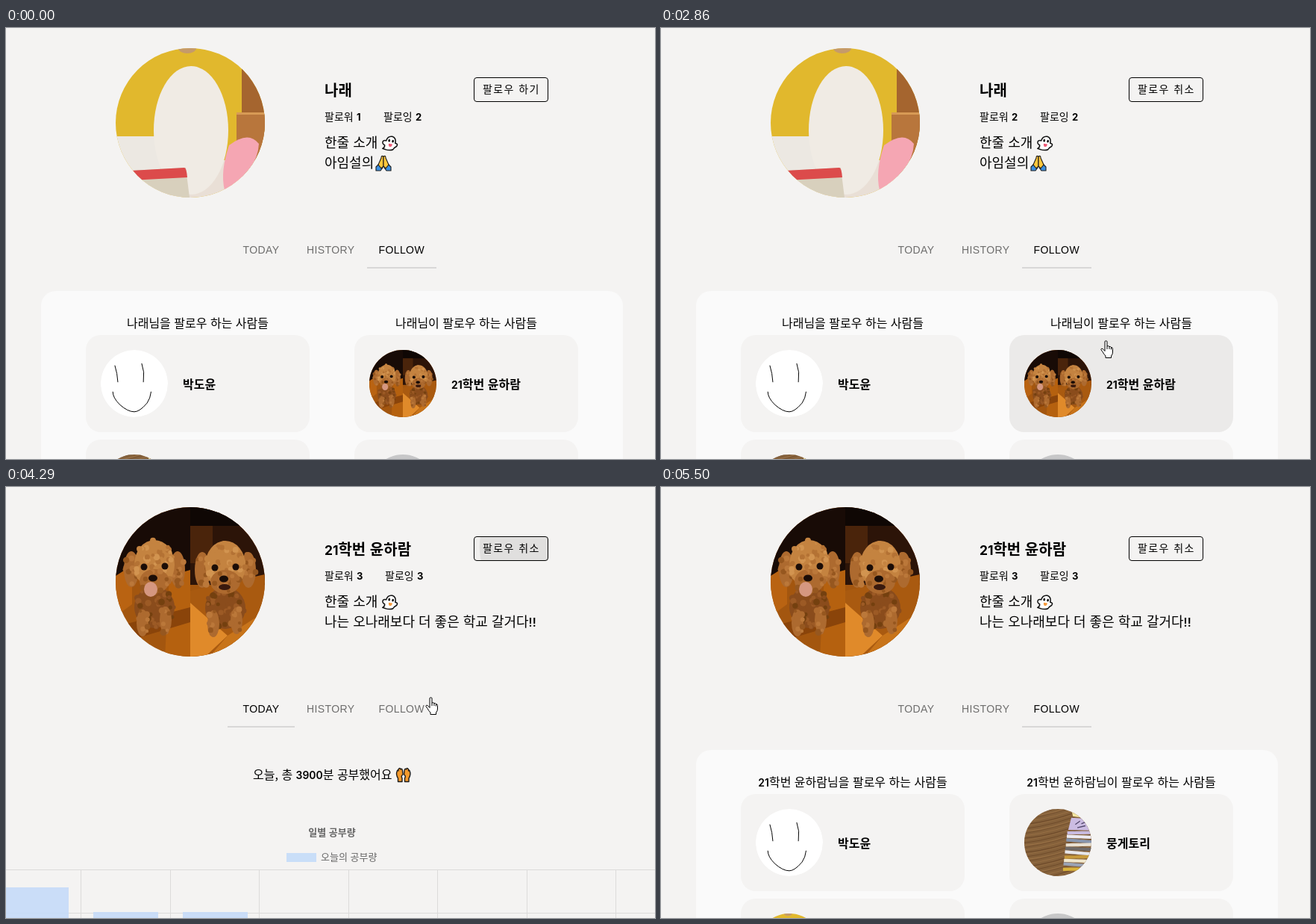
Write an HTML page that moves like this. It is 870 px wide and 577 px high and loops after 5.76 s.

```html
<!DOCTYPE html>
<html lang="ko">
<head>
<meta charset="utf-8">
<title>Follow page</title>
<style>
html, body { margin: 0; width: 100%; height: 100%; overflow: hidden; background: #f4f3f2; }
svg { display: block; width: 870px; height: 577px; }
text { font-family: 'Noto Sans CJK KR', 'Noto Sans KR', 'Noto Sans CJK', sans-serif; fill: #000; white-space: pre; }
.num { font-family: Inter, sans-serif; font-size: .87em; font-weight: 600; }
.bold, .bold .num { font-weight: 700; }
.tab { font: 14px 'Liberation Sans', Arial, sans-serif; letter-spacing: .4px; }
.mid { text-anchor: middle; }
.gray { fill: #666; }
</style>
</head>
<body>
<svg id="stage" viewBox="0 0 870 577" xmlns="http://www.w3.org/2000/svg"></svg>
<script>
const LOOP = 5760;
const HOST = '나래', FRIEND = '21학번 윤하람', FAN = '박도윤', PAL = '뭉게토리';

// Runs of picture changes: first time, last time, number of steps.
const RUNS = [
  [0, 0, 1], [320, 860, 9], [920, 1060, 3], [1320, 1850, 8], [1920, 2010, 2], [2150, 2150, 1],
  [2470, 3000, 8], [3090, 3230, 3], [3390, 3940, 8], [4010, 4570, 9], [4640, 5210, 9], [5270, 5500, 4]
];
// Pointer path: time, x, y.
const PATH = [
  [320, 850, 562], [500, 812, 400], [700, 735, 170], [860, 712, 92], [920, 709, 84], [1060, 707, 77],
  [1320, 707, 78], [1390, 704, 88], [1550, 668, 200], [1750, 640, 335], [1850, 633, 346],
  [1920, 643, 342], [2010, 652, 330], [2150, 652, 329], [2470, 627, 329], [2610, 598, 311],
  [2750, 592, 360], [2900, 600, 450], [3000, 605, 482], [3320, 605, 482], [3500, 620, 400],
  [3600, 665, 220], [3700, 706, 95], [3780, 712, 67], [3940, 711, 66], [4010, 710, 63],
  [4080, 706, 72], [4290, 570, 282], [4360, 551, 294], [4430, 551, 294], [4570, 565, 340],
  [4640, 581, 382], [5000, 622, 470], [5210, 630, 482], [5270, 636, 500], [5420, 650, 560], [5500, 655, 577]
];
const PAGE_OUT = 3080, PAGE_IN = 3160, TAB_CLICK = 4425;
const BUTTON = [627, 60, 100, 39], TABS = [297, 274, 280, 48];
const CARDS = [[107, 411], [467, 411], [107, 551], [467, 551]];

const clamp = v => Math.max(0, Math.min(1, v));
const mix = (a, b, k) => a + (b - a) * k;

// cubic-bezier(.4, 0, .2, 1)
function ease(p) {
  p = clamp(p);
  let lo = 0, hi = 1, s = 0;
  for (let i = 0; i < 20; i++) {
    s = (lo + hi) / 2;
    const x = 1.2 * s * (1 - s) ** 2 + .6 * s * s * (1 - s) + s ** 3;
    if (x < p) lo = s; else hi = s;
  }
  return 3 * s * s * (1 - s) + s ** 3;
}

function stepTime(t) {
  const [from, to, n] = RUNS.filter(r => r[0] <= t).pop();
  if (n === 1) return from;
  const gap = (to - from) / (n - 1);
  return from + Math.min(n - 1, Math.floor((t - from) / gap + .1)) * gap;
}

function pointerAt(t) {
  if (t < PATH[0][0] || t >= 5490) return null;
  const i = Math.max(1, PATH.findIndex(p => p[0] >= t));
  const [t0, x0, y0] = PATH[i - 1], [t1, x1, y1] = PATH[i];
  const k = clamp((t - t0) / (t1 - t0));
  return [Math.round(mix(x0, x1, k)), Math.round(mix(y0, y1, k))];
}

const inside = (p, [x, y, w, h]) => !!p && p[0] >= x && p[0] < x + w && p[1] >= y && p[1] < y + h;

// ---- drawing helpers
const rect = (x, y, w, h, fill, more = '') => `<rect x="${x}" y="${y}" width="${w}" height="${h}" fill="${fill}" ${more}/>`;
const oval = (x, y, rx, ry, fill) => `<ellipse cx="${x}" cy="${y}" rx="${rx}" ry="${ry}" fill="${fill}"/>`;
const path = (d, fill, more = '') => `<path d="${d}" fill="${fill}" ${more}/>`;
const label = (id, x, y, size, cls = '', body = '') =>
  `<text id="${id}" x="${x}" y="${y}" font-size="${size}" class="${cls}">${body}</text>`;
const num = s => String(s).replace(/[\d!]+/g, d => `<tspan class="num">${d}</tspan>`);
const photo = (id, body) => `<g id="${id}" clip-path="url(#disc)">${body}</g>`;
const avatar = (id, x, y, r) => `<use id="${id}" transform="translate(${x - r} ${y - r}) scale(${r / 100})"/>`;

let seed = 7;
const rand = () => (seed = seed * 16807 % 2147483647) / 2147483647;

const toyPhoto = rect(0, 0, 200, 200, '#e1b82d') +
  rect(169, 0, 31, 200, '#a5652f') + rect(162, 88, 40, 60, '#b8763c') + rect(162, 86, 40, 3, '#d79a55') +
  rect(0, 118, 60, 82, '#ece8e2') + rect(60, 150, 140, 50, '#e9dfd6') + oval(96, 0, 12, 7, '#c59a6a') +
  oval(101, 110, 50, 86, '#f0ebe4') +
  path('M152 130Q178 110 192 128Q190 165 146 190Q140 165 152 130Z', '#f5a6b3') +
  path('M20 164L94 160L99 200H20Z', '#d8d0bd') + path('M20 164L92 160Q95 160 96 173L20 177Z', '#dc4b4b');

// Scattered curls over an oval of fur.
function fur(x, y, rx, ry, tones) {
  let s = oval(x, y, rx, ry, tones[0]);
  for (let i = 0; i < rx * ry / 18; i++) {
    const a = rand() * 2 * Math.PI, d = Math.sqrt(rand()), r = 2 + rand() * 2.5;
    s += oval((x + d * rx * Math.cos(a)).toFixed(1), (y + d * ry * Math.sin(a)).toFixed(1), r.toFixed(1), r.toFixed(1), tones[i % tones.length]);
  }
  return s;
}
const DARK_FUR = ['#8a4c1c', '#9c5a25', '#74400f'], MID_FUR = ['#ad6a2f', '#bb783a', '#96571f'], LIGHT_FUR = ['#c48340', '#d29450', '#b47234'];

function dog(x, y) {
  return `<g transform="translate(${x} ${y})">` +
    fur(0, 55, 27, 28, DARK_FUR) + fur(-16, 76, 8, 18, MID_FUR) + fur(15, 72, 8, 18, MID_FUR) +
    fur(-31, 4, 10, 24, MID_FUR) + fur(31, 4, 10, 24, MID_FUR) + fur(0, -2, 27, 33, LIGHT_FUR) +
    fur(0, 20, 20, 16, MID_FUR) + oval(-14, 1, 4.5, 4.5, '#1b0d07') + oval(14, 0, 4.5, 4.5, '#1b0d07') +
    oval(-2, 16, 6, 4.5, '#1b0d07') + '</g>';
}
const dogPhoto = rect(0, 0, 200, 200, '#a3560f') + rect(0, 0, 100, 92, '#180b06') +
  path('M0 92L22 78V130L0 146Z', '#b96312') + path('M72 92L100 84V200H66Z', '#b5610f') +
  path('M0 160L100 134V154L0 184Z', '#8a440a') +
  rect(100, 0, 100, 104, '#2c1408') + rect(100, 0, 100, 25, '#0f0704') + rect(100, 25, 30, 50, '#4a240b') +
  path('M100 112L200 90V200H100Z', '#a95a10') + path('M100 128L150 172L120 200H100Z', '#e08a2a') +
  path('M150 172L200 140V200H126Z', '#c8741a') +
  dog(52, 79) + dog(147, 80) +
  oval(47, 110, 9, 10, '#d59780') + oval(146, 107, 8, 4, '#3a1a0e');

let grain = '';
for (let i = 0; i < 44; i++) {
  const y = i * 7 - 30;
  grain += path(`M0 ${y + 40}Q90 ${y + 26 + i % 3 * 4} 200 ${y - 14}`, 'none', `stroke="${i % 2 ? '#6d4a2a' : '#987045'}" stroke-width="${1.5 + i % 3 * .6}"`);
}
const bookColors = ['#c9bbe0', '#eceaf2', '#8795ad', '#e8e0d2', '#6f6a68', '#e6e6ea', '#c79a3c', '#f0e7cd', '#9aa3b5', '#d9b23a'];
const bookPhoto = rect(0, 0, 200, 200, '#84603a') + grain + path('M140 0H172L176 26L145 22Z', '#f3e6a2') +
  path('M140 26L200 30V64L131 62Z', '#cbbce2') + path('M152 46L166 36M170 44L184 38M158 56L182 50', 'none', 'stroke="#51476a" stroke-width="3"') +
  bookColors.map((c, i) => rect(128 - i * 1.4, 66 + i * 12, 80, 9.5, c, `transform="rotate(${i % 3 * 3 - 1} 160 ${70 + i * 12})"`)).join('');

const doodle = '<circle cx="100" cy="100" r="100" fill="#fff"/>' +
  path('M42 46L48 70L51 96M122 40L128 66L127 96M36 124Q36 142 56 162Q80 184 100 184Q116 184 138 158Q148 144 150 124', 'none', 'stroke="#000" stroke-width="2.2"');

const ghost = `<g transform="translate(504 144) rotate(10 11 11)" stroke="#111" stroke-width="1.5" stroke-linejoin="round">` +
  path('M5 8Q6 1 12 1Q18 2 17.5 9Q22 9 20 13Q17 15 16 18Q12 21 2 19Q5 17 4 14Q0 13 1 9Q3 7 5 8Z', '#fff') +
  `<g stroke="none">${oval(9, 7, 1.4, 1.9, '#111')}${oval(14, 7, 1.4, 1.9, '#111')}</g>` +
  `<path id="tongue" d="M9 11H14Q14 15 11.5 15Q9 15 9 11Z" stroke="none"/></g>`;
const prayer = `<g id="prayer" transform="translate(495 170)" stroke="#1c1c1c" stroke-width="1.1" stroke-linejoin="round">` +
  path('M1 16L5 12L10 17L7 21H1Z', '#3b8fe0') + path('M21 16L17 12L12 17L15 21H21Z', '#3b8fe0') +
  path('M11 2Q8 0 8 4L4 13L8 18L11 15Z', '#ffc83d') + path('M11 2Q14 0 14 4L18 13L14 18L11 15Z', '#ffc83d') + '</g>';
const palm = path('M8 18.5H2.5V14Q-.5 9 1 5Q2 2 3 4V2Q5 -1 6 2Q8 0 8.5 4L9 9Q6 11 8 14Z', '#f59a2c');
const raised = `<g transform="translate(523 376)" stroke="#1c1c1c" stroke-width="1.4" stroke-linejoin="round">${palm}<g transform="translate(19.5 0) scale(-1 1)">${palm}</g></g>`;

let chart = '';
for (let i = 0; i < 7; i++) chart += rect(Math.round(100 + i * 119.5), 512, 1, 65, '#dcdbda');
chart += rect(0, 512, 870, 1, '#dcdbda') + rect(0, 570, 870, 1, '#dcdbda');
for (let i = 0; i < 3; i++) chart += rect(-3 + i * 120, 577, 87, 0, '#c4dbfa', `id="bar${i}" fill-opacity=".88"`);

document.getElementById('stage').innerHTML = `
<defs>
  <clipPath id="disc"><circle cx="100" cy="100" r="100"/></clipPath>
  <clipPath id="btnClip"><rect x="627" y="66" width="100" height="33" rx="4"/></clipPath>
  <clipPath id="tabClip"><rect x="484" y="274" width="93" height="48"/></clipPath>
  ${photo('toy', toyPhoto)}${photo('dogs', dogPhoto)}${photo('books', bookPhoto)}${photo('doodle', doodle)}
  <g id="blank"><circle cx="100" cy="100" r="100" fill="#c7c7c8"/></g>
</defs>
${rect(0, 0, 870, 577, '#f4f3f2')}
<g id="page">
  ${avatar('portrait', 247, 127, 100)}
  ${label('title', 427, 91, 20, 'bold')}
  ${label('', 427, 124, 14, '', '팔로워')}${label('followers', 470, 123.5, 15, 'bold')}
  ${label('followingLabel', 506, 124, 14, '', '팔로잉')}${label('following', 549, 123.5, 15, 'bold')}
  ${label('', 427, 160, 18, '', '한줄 소개')}${label('intro', 427, 186.5, 18)}${ghost}${prayer}
  ${rect(627.5, 66.5, 99, 32, '#000', 'id="button" rx="3.5" stroke="#000"')}
  <g clip-path="url(#btnClip)"><circle id="btnRipple"/></g>
  <text id="action" x="639" y="86.5" font-size="14" font-weight="300" letter-spacing="1.4"></text>
  ${rect(297, 320, 90, 2, '#d8d7d7', 'id="indicator"')}
  <g clip-path="url(#tabClip)"><circle id="tabRipple"/></g>
  <text class="tab" id="tab0" x="317.5" y="302">TODAY</text>
  <text class="tab" x="403" y="302" fill-opacity=".55">HISTORY</text>
  <text class="tab" id="tab2" x="499.5" y="302">FOLLOW</text>
  <g id="today">
    ${label('', 331, 390.5, 16, '', '오늘, 총 ' + num(3900) + '분 공부했어요')}${raised}
    ${label('', 437, 467, 13, 'bold mid gray', '일별 공부량')}
    ${rect(376, 490, 40, 12, '#c9def8')}${label('', 422, 500, 13, 'gray', '오늘의 공부량')}
    ${chart}
  </g>
  <g id="follow">
    ${rect(47, 352, 780, 300, '#fafafa', 'rx="20"')}
    ${label('headL', 257, 400.5, 16, 'mid')}${label('headR', 617, 400.5, 16, 'mid')}
    ${CARDS.map(([x, y], i) => rect(x, y, 300, 130, '#f4f3f2', `id="card${i}" rx="20"`) + avatar('face' + i, x + 65, y + 65, 45)).join('')}
    ${label('nameL', 237, 482.5, 16, 'bold')}${label('nameR', 597, 482.5, 16, 'bold')}
  </g>
</g>
<path id="arrow" d="M.5 .5V16.5L4.2 13L6.8 18.8L9.2 17.7L6.7 12.1H11.5Z" fill="#fff"/>
<path id="hand" d="M6 1.5Q7.5 0 9 1.5V8Q10.5 7 12 8.5Q13.5 8 14.5 9.5Q16.5 9.5 16.5 11.5V16Q16.5 19 14.5 21V23.5H7V21Q4.5 18.5 3 15.5L.8 12.5Q1 10.5 3.2 11.5L6 14.5ZM9 8V12M12 8.5V12M14.5 9.5V12.5" fill="#fff" stroke="#000"/>`;

// ---- updates
const nodes = {}, last = {};
const $ = id => nodes[id] || (nodes[id] = document.getElementById(id));
const set = (id, attrs) => { for (const k in attrs) $(id).setAttribute(k, attrs[k]); };
const show = (id, on) => set(id, { visibility: on ? 'inherit' : 'hidden' });
const write = (id, s) => { if (last[id] !== s) $(id).innerHTML = last[id] = s; };

function ripple(id, t, start, x, y, size) {
  const r = size * ease((t - start) / 550);
  const alpha = t < start ? 0 : .3 * (1 - ease((t - start - 55) / 550));
  set(id, { cx: x, cy: y, r, 'fill-opacity': alpha });
}

function render(now) {
  const t = stepTime(now % LOOP);
  const second = t >= PAGE_OUT, loaded = !second || t >= PAGE_IN - 1;
  const follow = !second || t >= TAB_CLICK;
  const followed = second ? t >= 4075 : t >= 1385;
  const who = second ? FRIEND : HOST;

  set('page', { visibility: loaded ? 'visible' : 'hidden' });
  show('follow', follow);
  show('today', !follow);
  show('prayer', !second);
  set('tongue', { fill: second ? '#f59a3c' : '#ee5a75' });
  set('portrait', { href: second ? '#dogs' : '#toy' });

  write('title', num(who));
  write('followers', num((second ? 2 : 1) + followed));
  write('following', num(second ? 3 : 2));
  const shift = second || followed ? 2 : 0;
  set('followingLabel', { x: 506 + shift });
  set('following', { x: 549 + shift });
  write('intro', second ? num('나는 오나래보다 더 좋은 학교 갈거다!!') : '아임설의');
  write('action', followed ? '팔로우 취소' : '팔로우 하기');

  const [enter, leave, press] = second ? [3760, 4130, 3960] : [900, 1440, 1265];
  const glow = clamp((t - enter) / 150) - clamp((t - leave) / 250);
  set('button', { 'fill-opacity': .045 * Math.max(0, glow) });
  ripple('btnRipple', t, press, second ? 710 : 707, 80, 86);
  ripple('tabRipple', t, 4372, 551, 294, 73);

  const slide = second ? ease((t - TAB_CLICK) / 300) : 1;
  set('indicator', { x: mix(297, 484, slide), width: mix(90, 93, slide) });
  set('tab0', { 'fill-opacity': follow ? .55 : 1 });
  set('tab2', { 'fill-opacity': follow ? 1 : .55 });

  write('headL', num(who) + '님을 팔로우 하는 사람들');
  write('headR', num(who) + '님이 팔로우 하는 사람들');
  write('nameL', FAN);
  write('nameR', num(second ? PAL : FRIEND));
  const faces = second ? ['doodle', 'books', 'toy', 'blank'] : ['doodle', 'dogs', 'books', 'blank'];
  faces.forEach((f, i) => set('face' + i, { href: '#' + f }));

  const grow = 1 - (1 - clamp((t - PAGE_IN) / 1000)) ** 4;
  [324, 291, 291].forEach((h, i) => set('bar' + i, { y: 860 - h * grow, height: h * grow }));

  const p = pointerAt(t);
  let active = loaded && (inside(p, BUTTON) || inside(p, TABS));
  CARDS.forEach(([x, y], i) => {
    const over = loaded && follow && inside(p, [x, y, 300, 130]);
    set('card' + i, { fill: over ? '#ebeae9' : '#f4f3f2' });
    active = active || over;
  });
  show('arrow', p && !active);
  show('hand', p && active);
  if (p) {
    set('arrow', { transform: `translate(${p[0]} ${p[1]})`, stroke: loaded ? '#000' : '#999' });
    set('hand', { transform: `translate(${p[0] - 8} ${p[1] - 1})` });
  }
}

const begin = performance.now();
function tick() {
  render(performance.now() - begin);
  requestAnimationFrame(tick);
}
tick();
</script>
</body>
</html>
```
